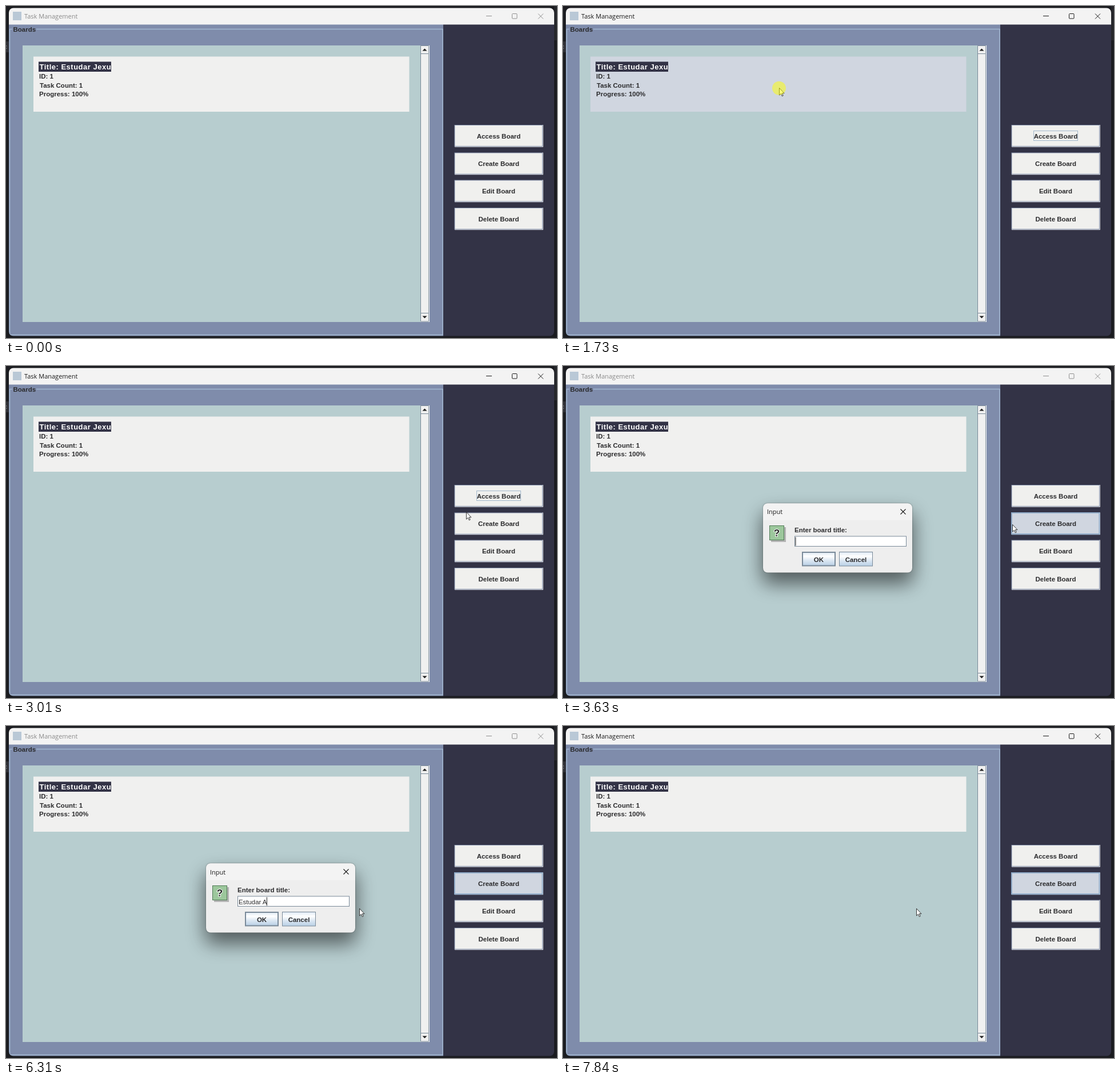
Recreate the animation shown at these times as an HTML page. Size 964 by 581 pixels, loop 8000 ms.

```html
<!DOCTYPE html>
<html lang="en">
<head>
<meta charset="utf-8">
<title>Task Management</title>
<style>
  html, body { margin: 0; width: 100%; height: 100%; overflow: hidden; background: #1b1c20; }
  svg { display: block; }
  text { font: bold 11.5px "Liberation Sans", Arial, sans-serif; fill: #2b2b2d; white-space: pre; }
  .mid { text-anchor: middle; }
  .bar { font: 11px "Open Sans", "Noto Sans", sans-serif; fill: #1a1a1a; }
  .heading { font-size: 13px; letter-spacing: .5px; fill: #fff; }
  .typed { font-weight: normal; font-size: 11.4px; }
  .line { fill: none; stroke: #1a1a1a; }
  #frame.idle .bar { fill: #8a8a8a; }
  #frame.idle .line { stroke: #8f8f8f; }
  #dialog { transform-origin: 480px 301px; filter: drop-shadow(0 18px 17px rgba(0, 0, 0, .45)) drop-shadow(0 0 1px rgba(0, 0, 0, .4)); }
</style>
</head>
<body>
<svg width="964" height="581" viewBox="0 0 964 581">
  <defs>
    <linearGradient id="steel" x2="0" y2="1">
      <stop stop-color="#dde8f3"/>
      <stop offset=".3" stop-color="#fff"/>
      <stop offset=".6" stop-color="#dde8f3"/>
      <stop offset="1" stop-color="#b8cfe5"/>
    </linearGradient>
    <clipPath id="round"><rect x="5" y="3.5" width="954" height="574" rx="8"/></clipPath>
  </defs>

  <path d="M0 62h5v19h-5z" fill="#2f3036"/>
  <path d="M959 0h5v60h-5z" fill="#26272b"/>
  <text x="-3" y="75" style="font-weight:normal;font-size:10px;fill:#8a8b90">c</text>

  <g id="frame" clip-path="url(#round)">
    <path d="M5 3h954v30H5z" fill="#f3f3f3"/>
    <rect x="12" y="10" width="15" height="15" fill="#b9c8d6"/>
    <text class="bar" x="32" y="22">Task Management</text>
    <path class="line" d="M840 17.5h10M931 13.500l9 9m0-9l-9 9"/>
    <rect class="line" x="885.500" y="13.500" width="8.500" height="8.500" rx="1"/>

    <path d="M5 32.500h760V578H5z" fill="#7f8cab"/>
    <path d="M765 32.500h194V578H765z" fill="#333346"/>
    <path d="M11 40.500H6.500V575.500H764V40.500H53" fill="none" stroke="#a3b8d2" stroke-width="1.500"/>
    <text x="12.500" y="45">Boards</text>

    <path d="M29 69h696v484H29z" fill="#b7cdcf"/>
    <rect id="card" x="48" y="88.500" width="657.500" height="96.500"/>
    <path d="M57 97.500h127V115H57z" fill="#333346"/>
    <text class="heading" x="58.500" y="110.500">Title: Estudar Jexu</text>
    <text x="58" y="127">ID: 1</text>
    <text x="59" y="142.500">Task Count: 1</text>
    <text x="58" y="158">Progress: 100%</text>

    <path d="M725 69h16v484h-16z" fill="#f0f0f0"/>
    <path d="M725.500 69.500h14v14h-14zV552h14V83.500M725.500 537.500h14" fill="none" stroke="#7a8a99"/>
    <path d="M740.500 69V553" stroke="#fff"/>
    <path d="M728.500 78.500l4-4 4 4zM728.500 542.500l4 4 4-4z" fill="#1c1c1c"/>

    <g id="buttons"></g>
    <rect id="focus" x="823.500" y="218.500" width="77" height="17" fill="none" stroke="#a3b8cc"/>
  </g>

  <g id="dialog">
    <rect x="350" y="240.500" width="261" height="121" rx="8" fill="#eee"/>
    <path d="M350 270v-21.500a8 8 0 0 1 8-8h245a8 8 0 0 1 8 8V270z" fill="#f3f3f3"/>
    <text class="bar" x="357" y="259.500">Input</text>
    <path class="line" d="M590.500 250.500l9 9m0-9l-9 9" stroke-width="1.100"/>
    <path d="M364 282h26v26h-26z" fill="#b4b4b4"/>
    <rect x="361.500" y="279.500" width="25" height="25" fill="#9cc79c" stroke="#4f7a55"/>
    <text class="mid" x="374" y="298" style="font-size:17px;stroke:#fff;stroke-width:2px;paint-order:stroke;fill:#222">?</text>
    <text x="405" y="291">Enter board title:</text>
    <rect x="405.500" y="298" width="195" height="17.500" fill="#fff" stroke="#7a8a99"/>
    <text id="typed" class="typed" x="407" y="312"></text>
    <path id="caret" d="M0 299.500v15" stroke="#222"/>
    <rect x="419" y="326" width="57" height="23.500" fill="url(#steel)" stroke="#7a8a99" stroke-width="2"/>
    <rect x="483.500" y="325.500" width="58" height="24.500" fill="url(#steel)" stroke="#7a8a99"/>
    <text class="mid" x="447.500" y="343">OK</text>
    <text class="mid" x="512.500" y="343">Cancel</text>
  </g>

  <g id="pointer">
    <path d="M.5.5V13l2.900-2.700L5.300 14.700l1.900-.8-1.900-4.300H9z" fill="#fff" stroke="#222" stroke-width=".9"/>
    <circle id="press" cy=".8" r="12" fill="#ff0" opacity=".5"/>
  </g>
</svg>
<script>
const LOOP = 8000;
const $ = id => document.getElementById(id);
const within = (t, a, b) => t >= a && t < b;
const clamp = v => Math.min(1, Math.max(0, v));
const show = (id, on) => $(id).style.display = on ? '' : 'none';

$('buttons').innerHTML = ['Access', 'Create', 'Edit', 'Delete'].map((name, i) => {
  const y = 208 + Math.round(i * 96.6) / 2;
  return `<path d="M785 ${y + 38}h154v-38" fill="none" stroke="#fff" stroke-width="1.500"/>
    <rect x="785" y="${y + .5}" width="153.500" height="37" fill="#f0f0ee" stroke="#8996b0"/>
    <text class="mid" x="862" y="${y + 23.7}">${name} Board</text>`;
}).join('');
const createFace = $('buttons').querySelectorAll('rect')[1];

// time, x, y of the pointer tip
const path = [
  [450, 834, 579], [580, 814, 559], [730, 814, 559], [900, 700, 478],
  [1060, 545, 373], [1200, 392, 243], [1300, 352, 200], [1460, 378, 143],
  [1730, 378, 143], [2000, 368, 146], [2260, 368, 146], [2460, 372, 149],
  [2530, 372, 149], [2600, 410, 190], [2700, 500, 250], [2800, 630, 297],
  [2880, 697, 292], [3010, 805, 255], [3150, 793, 279], [3290, 786, 277],
  [3700, 786, 277], [4040, 618, 319], [LOOP, 618, 319]
];
const entry = 'Estudar Aponier';
const keyTimes = [4770, 4900, 5230, 5360, 5430, 5560, 5690, 5960,
  6310, 6440, 6640, 6710, 6910, 6980, 7180];

function pointerAt(t) {
  const i = Math.max(1, path.findIndex(p => p[0] > t));
  const [t0, x0, y0] = path[i - 1], [t1, x1, y1] = path[i];
  const k = clamp((t - t0) / (t1 - t0));
  return [x0 + (x1 - x0) * k, y0 + (y1 - y0) * k];
}

function drawDialog(t) {
  const open = clamp((t - 3490) / 150), close = clamp((t - 7620) / 200);
  show('dialog', open > 0 && close < 1);
  const ease = 1 - (1 - open) ** 3;
  $('dialog').style.opacity = ease * (1 - close);
  $('dialog').style.transform = `scale(${.9 + .1 * ease - .08 * close})`;

  const count = keyTimes.filter(k => k <= t).length;
  $('typed').textContent = entry.slice(0, count);
  const x = 407 + (count ? $('typed').getComputedTextLength() : 0);
  $('caret').setAttribute('transform', `translate(${x.toFixed(1)})`);
  show('caret', !within(t, 4500, 4770));
}

function draw() {
  const t = performance.now() % LOOP;
  const active = within(t, 1660, 3500) || t >= 7700;
  $('frame').classList.toggle('idle', !active);
  show('focus', within(t, 1660, 3430));
  $('card').setAttribute('fill',
    within(t, 1340, 1800) ? '#d0d6e0' : within(t, 1800, 2390) ? '#a2b0c8' : '#f0f0ef');

  const hover = t >= 3080;
  createFace.setAttribute('fill', hover ? '#d0d6e0' : '#f0f0ee');
  createFace.setAttribute('stroke', hover ? '#93aecb' : '#8996b0');
  createFace.setAttribute('stroke-width', hover ? 2 : 1);

  drawDialog(t);
  show('pointer', t >= 450);
  $('pointer').setAttribute('transform', `translate(${pointerAt(t)})`);
  show('press', within(t, 1660, 1800) || within(t, 2190, 2390) || within(t, 3360, 3490));
  requestAnimationFrame(draw);
}
draw();
</script>
</body>
</html>
```
